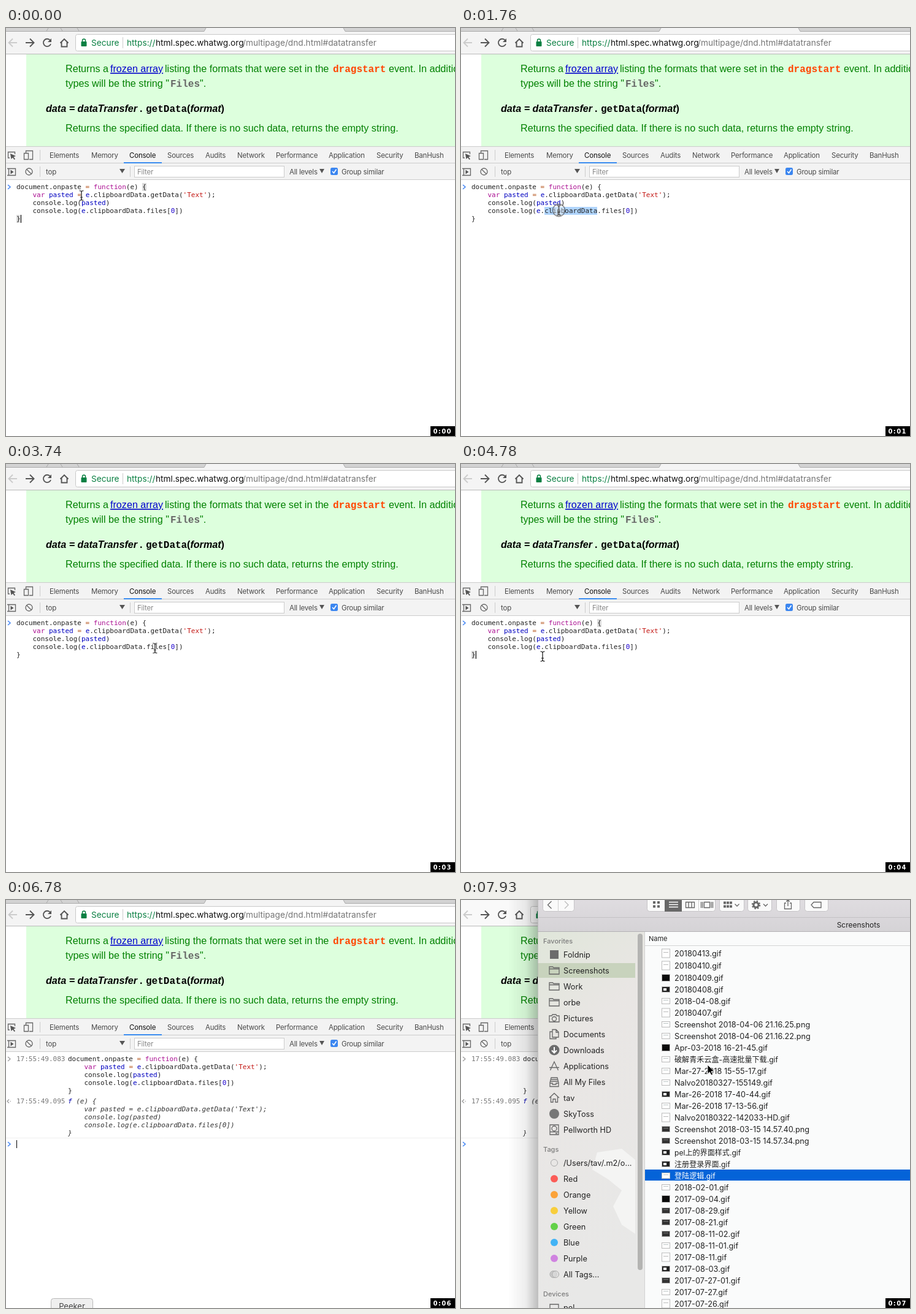
Animation, 732 px wide and 666 px high, one loop 8 s. Source, as an HTML page:

```html
<!DOCTYPE html>
<html lang="en">
<head>
<meta charset="utf-8">
<title>Paste handler in the console</title>
<style>
html, body { margin: 0; width: 100%; height: 100%; overflow: hidden; background: #fff; }
svg { display: block; }
text { white-space: pre; }
.ui { font: 11.5px Inter, Roboto, sans-serif; letter-spacing: -.2px; fill: #4a4a4a; }
.url { font: 13.7px Inter, Roboto, sans-serif; }
.page { font: 16.15px "Liberation Sans", Arial, sans-serif; fill: #008000; }
.page .m { font: bold 16px "Liberation Mono", monospace; }
.page .b { font-weight: bold; fill: #000; }
.page .i { font-style: italic; }
.code { font: 11px "DejaVu Sans Mono", monospace; fill: #222; }
.k { fill: #aa0d91; } .v { fill: #0000c0; } .o { fill: #b5541c; } .s { fill: #c41a16; } .n { fill: #1c00cf; }
.plain { font-style: italic; fill: #333; }
.plain tspan { fill: inherit; }
.files { font: 12.7px Inter, "Noto Sans CJK SC", "Noto Sans CJK", sans-serif; fill: #222; }
.files .cjk { font-size: 12.1px; }
.files .head { font-size: 11px; font-weight: 500; fill: #7c7c7c; }
.line { fill: none; stroke: #666; stroke-width: 1.3; }
.clock { font: bold 10px "DejaVu Sans", sans-serif; letter-spacing: 1.4px; fill: #fff; }

.anim, .path { animation: 8s step-end infinite; }
.path { animation-name: path; animation-timing-function: linear; }
.before { animation-name: before; } .after { animation-name: after; }
.caret { animation-name: caret; } .brace { animation-name: brace; }
.select { animation-name: select; } .ring { animation-name: ring; }
.prompt { animation-name: prompt; } .tip { animation-name: tip; }
.window { animation-name: window; } .inactive { animation-name: inactive; }
.ticks { animation-name: ticks; }

@keyframes before { 0% { opacity: 1 } 68.625% { opacity: 0 } }
@keyframes after { 0% { opacity: 0 } 68.625% { opacity: 1 } }
@keyframes caret {
  0%, 11.875%, 55.375%, 65.75% { opacity: 1 }
  5.9%, 20.5%, 64.25% { opacity: 0 }
}
@keyframes brace { 0%, 55.375% { opacity: 1 } 20.5% { opacity: 0 } }
@keyframes select { 0%, 36.625% { opacity: 0 } 22% { opacity: 1 } }
@keyframes ring {
  0%, 24.875%, 40.875%, 59.75% { opacity: 0 }
  20.5%, 36.625%, 55.375% { opacity: 1 }
}
@keyframes prompt { 0%, 81.875% { opacity: 1 } 76.125%, 93% { opacity: 0 } }
@keyframes tip { 0%, 96.125% { opacity: 0 } 83.25% { opacity: 1 } }
@keyframes window { 0% { opacity: 0 } 90.75% { opacity: 1 } }
@keyframes inactive { 0% { opacity: 0 } 93% { opacity: 1 } }
@keyframes ticks {
  0% { transform: translateY(0) }
  16.25% { transform: translateY(-16px) }
  29.25% { transform: translateY(-32px) }
  40.875% { transform: translateY(-48px) }
  54% { transform: translateY(-64px) }
  65.75% { transform: translateY(-80px) }
  79% { transform: translateY(-96px) }
  93% { transform: translateY(-112px) }
}
@keyframes path {
  0%, 1.4% { transform: translate(123px, 273.5px) }
  3.1% { transform: translate(132px, 267px) }
  6% { transform: translate(152px, 270px) }
  8.9% { transform: translate(172px, 288px) }
  10.4% { transform: translate(178px, 295px) }
  14.75% { transform: translate(166px, 297px) }
  17.6%, 24% { transform: translate(159.5px, 297.5px) }
  30.6%, 42.5% { transform: translate(257px, 297px) }
  46.75% { transform: translate(243px, 300.5px) }
  52.75%, 75.9% { transform: translate(133px, 314px) }
  81.8%, 95% { transform: translate(112px, 674px) }
  96.1% { transform: translate(330px, 420px) }
  97.6% { transform: translate(416px, 285px) }
  99.1%, 100% { transform: translate(404px, 267px) }
}
</style>
</head>
<body>
<svg width="732" height="666" viewBox="0 0 732 666">
  <defs>
    <linearGradient id="shade"><stop offset="0" stop-opacity="0"/><stop offset=".6" stop-opacity=".07"/><stop offset="1" stop-opacity=".25"/></linearGradient>
    <linearGradient id="bar" x2="0" y2="1"><stop stop-color="#dfdce0"/><stop offset="1" stop-color="#d5d3d6"/></linearGradient>
    <linearGradient id="side" x2=".25" y2="1"><stop stop-color="#e0e6da"/><stop offset=".35" stop-color="#e9e6e4"/><stop offset="1" stop-color="#e8e8e7"/></linearGradient>
  </defs>

  <!-- browser chrome -->
  <rect width="732" height="42" fill="#f4f4f4"/>
  <path d="M0 0H326L323 5.5H0ZM550 0H732V5.5H553Z" fill="#d3d3d3"/>
  <path d="M0 5.5H323L326 0M550 0L553 5.5H732M66 5L69 0M89 0L92 5M116 0L119 5" fill="none" stroke="#aaa"/>
  <rect class="anim inactive" width="126" height="42" fill="#f9f9f9"/>
  <rect x="113.5" y="10.5" width="640" height="27" rx="3" fill="#fff" stroke="#c9c9c9"/>
  <path d="M0 42.5H732" stroke="#b9b9b9"/>
  <g fill="none" stroke="#555" stroke-width="1.9">
    <path d="M18 24H5M11 17.500L4.500 24L11 30.500" stroke="#ccc"/>
    <path d="M32 24H45M39 17.500L45.500 24L39 30.500"/>
    <path d="M72 20A6.200 6.200 0 1 0 73 26"/>
    <path d="M88.500 24.500L95 18L101.500 24.500M90.500 23V30.500H99.500V23"/>
  </g>
  <path d="M74 17V23H68Z" fill="#555"/>
  <rect x="122.500" y="22" width="9" height="8" rx="1" fill="#0b8043"/>
  <path d="M124.500 22V20.500A2.500 2.500 0 0 1 129.500 20.500V22" fill="none" stroke="#0b8043" stroke-width="1.500"/>
  <path d="M190.500 15V33" stroke="#ccc"/>
  <g class="url">
    <text x="139" y="29" fill="#0b8043">Secure</text>
    <text x="197" y="29" fill="#0b8043">https://</text>
    <text x="244" y="29" fill="#111">html.spec.whatwg.org</text>
    <text x="386" y="29" fill="#757575">/multipage/dnd.html#datatransfer</text>
  </g>

  <!-- page -->
  <rect x="33" y="43" width="699" height="150" fill="#dfd"/>
  <g class="page">
    <text x="97" y="72">Returns a</text>
    <text x="170" y="72" fill="#00c" text-decoration="underline">frozen array</text>
    <text x="259" y="72">listing the formats that were set in the</text>
    <text x="533" y="72" class="m" fill="#ff4500">dragstart</text>
    <text x="624" y="72">event. In addition, if any</text>
    <text x="97" y="96">types will be the string "</text>
    <text x="268" y="96" class="m" fill="#666">Files</text>
    <text x="316" y="96">".</text>
    <text x="65" y="137" class="b i">data = dataTransfer</text>
    <text x="218" y="137" class="b">.</text>
    <text x="228" y="137" class="b m">getData</text>
    <text x="295" y="137" class="b">(<tspan class="i">format</tspan>)</text>
    <text x="97" y="169">Returns the specified data. If there is no such data, returns the empty string.</text>
  </g>

  <!-- developer tools -->
  <rect y="193" width="732" height="473" fill="#fff"/>
  <rect y="193" width="732" height="55" fill="#f3f3f3"/>
  <path d="M0 193.500H732M0 220.500H732M0 247.500H732M55.500 199V216M55.500 226V243M202.500 226V243" stroke="#ccc"/>
  <rect x="192" y="219" width="62" height="2" fill="#3b8df0"/>
  <g class="line">
    <path d="M6 212H3.500V202.500H14.500V206M32.500 204V200.500H43.500V214.500H38M29.500 204.500H36.500V214.500H29.500Z"/>
    <path d="M2 229.500H15.500V240.500H2M4.500 229.500V240.500"/>
    <circle cx="37.500" cy="234.500" r="5.500"/><path d="M33.500 230.500L41.500 238.500"/>
  </g>
  <path d="M7 205L16 209L12.500 210.500L15 214L13.500 215L11 211.500L8.500 214ZM7.500 231.500L12.500 235L7.500 238.500ZM185 230H194L189.500 237ZM511 230H519L515 237Z" fill="#555"/>
  <rect x="209.500" y="225.500" width="244" height="18" fill="#fff" stroke="#ccc"/>
  <rect x="529" y="228" width="12" height="12" rx="2.500" fill="#3b86f0"/>
  <path d="M532 234L534.500 236.800L538.500 230.800" fill="none" stroke="#fff" stroke-width="1.600"/>
  <g class="ui" id="tools"></g>

  <!-- console -->
  <g class="code">
    <g class="anim before">
      <g class="anim brace" fill="#dcdcdc"><path d="M222 253h7v13h-7zM17 305h7v13h-7z"/></g>
      <rect class="anim select" x="136" y="292" width="86" height="13" fill="#b0d5fd"/>
      <path d="M3 256L7 259.500L3 263" fill="none" stroke="#4285f4" stroke-width="1.500"/>
      <g id="typed"></g>
      <rect class="anim caret" x="24" y="305" width="1" height="13" fill="#000"/>
    </g>
    <g class="anim after">
      <path d="M3 256L7 259.500L3 263M5 325.500L2 328.500L5 331.500M6.500 328.500H8" fill="none" stroke="#999" stroke-width="1.200"/>
      <path d="M3 395L7 398.500L3 402" fill="none" stroke="#4285f4" stroke-width="1.500"/>
      <path d="M0 388.500H732" stroke="#eee"/>
      <text x="17" y="263" fill="#777">17:55:49.083</text>
      <text x="17" y="332" fill="#777">17:55:49.095</text>
      <g id="entered"></g>
      <g id="result" class="plain"></g>
      <rect class="anim prompt" x="17" y="392" width="1" height="13" fill="#000"/>
    </g>
  </g>

  <!-- file window -->
  <g class="anim window files">
    <rect x="77" width="48" height="666" fill="url(#shade)"/>
    <rect x="125" width="607" height="666" fill="#fafbfb"/>
    <rect x="125" y="52" width="175" height="614" fill="url(#side)"/>
    <path d="M222 412L262 406L284 424V545L262 530L248 500L262 474L240 456L214 440Z" fill="#f4f4f3"/>
    <rect x="125" y="103" width="159" height="24" fill="#c8d3bd"/>
    <rect x="288" y="55" width="8" height="549" rx="4" fill="#b4b4b2"/>
    <path d="M299.500 52V666" stroke="#d2d2d2"/>
    <rect x="125" width="607" height="52" fill="url(#bar)"/>
    <path d="M125 28.500H732" stroke="#c4c2c5"/><path d="M125 51.500H732" stroke="#b3b1b4"/>
    <path d="M125.500 0V666" stroke="#aaa" stroke-opacity=".6"/>
    <g id="buttons" fill="#fafafa" stroke="#c6c4c7"></g>
    <rect x="332" width="28" height="19" fill="#686868"/>
    <path d="M158.500 0V19M387.500 0V19" stroke="#d0d0d0"/>
    <g class="line">
      <path d="M147.500 2L141.500 8L147.500 14M446.500 6.500L450 10L453.500 6.500M493 6.500L496.500 10L500 6.500"/>
      <path d="M169 2L175 8L169 14" stroke="#bbb"/>
      <path d="M339 3.500H354M339 7.500H354M339 11.500H354" stroke="#fff"/>
      <path d="M366.500 3.500H380.500V12.500H366.500ZM371 3V13M376 3V13M396.500 3.500H405.500V12.500H396.500ZM394 3V13M391.500 3V13M408 3V13M410.500 3V13"/>
      <path d="M530 5H527.500V14.500H538.500V5H536M533 10V0M530 2.500L533 0L536 2.500M571 8L575 3.500H587V12.500H575Z"/>
      <circle cx="481" cy="8" r="4" stroke-width="3"/><circle cx="481" cy="8" r="6.200" stroke-dasharray="2.400 2.470" stroke-width="2"/>
      <path d="M313 4H325M313 10.500H325" stroke-width="4" stroke-dasharray="4 3"/>
      <path d="M428 4.500H442M428 10.500H442" stroke-width="4" stroke-dasharray="4 1"/>
    </g>
    <text x="648" y="44.500" text-anchor="middle" font-size="12">Screenshots</text>
    <text x="306" y="67" font-size="11">Name</text>
    <path d="M300 74.500H732" stroke="#d4d4d4"/>
    <rect x="300" y="440" width="432" height="18" fill="#0463d8"/>
    <g id="sidebar"></g>
    <g id="list"></g>
  </g>

  <g class="anim tip">
    <rect x="73.500" y="650.500" width="68" height="24" rx="4" fill="#efefef" stroke="#b8b8b8"/>
    <text x="107.500" y="668" text-anchor="middle" font-family="Inter, sans-serif" font-size="13" fill="#444">Peeker</text>
  </g>

  <!-- pointer -->
  <g class="path">
    <circle class="anim ring" r="10" fill="#fff" fill-opacity=".35" stroke="#222"/>
    <g class="anim before" fill="none">
      <path d="M-3.500 -8Q0 -8 0 -5.500Q0 -8 3.500 -8M0 -6V6M-3.500 8Q0 8 0 5.500Q0 8 3.500 8M-2 3H2" stroke="#fff" stroke-width="2.400" stroke-opacity=".6"/>
      <path d="M-3.500 -8Q0 -8 0 -5.500Q0 -8 3.500 -8M0 -6V6M-3.500 8Q0 8 0 5.500Q0 8 3.500 8M-2 3H2" stroke="#111" stroke-width="1.200"/>
    </g>
    <path class="anim after" d="M-2 2V17L1.500 13.800L4 19L6.500 18L4.200 12.800H9Z" fill="#000" stroke="#fff" stroke-width=".9"/>
  </g>

  <svg x="692" y="650" width="40" height="16" overflow="hidden">
    <rect width="40" height="16" fill="#000"/>
    <g class="anim ticks clock" id="clock"></g>
  </svg>
</svg>

<script>
const fill = (id, html) => { document.getElementById(id).innerHTML = html; };
const text = (x, y, s, attrs = '') => `<text x="${x}" y="${y}" ${attrs}>${s}</text>`;
const span = (cls, s) => `<tspan class="${cls}">${s}</tspan>`;

const tabs = [['Elements', 71], ['Memory', 139], ['Console', 201], ['Sources', 263], ['Audits', 325],
  ['Network', 377], ['Performance', 440], ['Application', 526], ['Security', 604], ['BanHush', 666]];
const controls = [['top', 65], ['Filter', 214], ['All levels', 462], ['Group similar', 547]];
fill('tools',
  tabs.map(([s, x]) => text(x, 212, s, s === 'Console' ? 'fill="#111"' : '')).join('') +
  controls.map(([s, x]) => text(x, 239, s, s === 'Filter' ? 'fill="#888"' : '')).join(''));

const opening = `document.onpaste ${span('o', '=')} ${span('k', 'function')}(e) {`;
const body = [
  `${span('k', 'var')} ${span('v', 'pasted')} ${span('o', '=')} ${span('v', 'e')}.clipboardData.getData(${span('s', "'Text'")});`,
  `console.log(${span('v', 'pasted')})`,
  `console.log(${span('v', 'e')}.clipboardData.files[${span('n', '0')}])`,
];
const codeBlock = (x, y, first) => text(x, y, first) +
  body.map((s, i) => text(x + 26.5, y + 13 * (i + 1), s)).join('') + text(x, y + 52, '}');
fill('typed', codeBlock(17, 263, opening));
fill('entered', codeBlock(101, 263, opening));
fill('result', codeBlock(101, 332, '<tspan style="fill:#00a">f</tspan> (e) {'));

fill('buttons', [[133, 51], [303, 111], [421, 40], [467, 39], [514, 38], [560, 38]]
  .map(([x, w]) => `<rect x="${x + .5}" y="-6.5" width="${w}" height="25" rx="4"/>`).join(''));

// Sidebar icons, drawn around their own centre
const stroke = d => `<path class="line" d="${d}"/>`;
const dot = color => `<circle r="6" fill="${color}"/>`;
const icons = {
  square: '<rect x="-7" y="-7" width="14" height="14" fill="#6c6c6c"/>',
  folder: stroke('M-8 6V-6H-2.500L-1 -4.500H8V6ZM-8 -2.500H8'),
  camera: stroke('M-8 6V-4H-4L-3 -6H3L4 -4H8V6ZM3.500 1A3.500 3.500 0 1 1 -3.500 1A3.500 3.500 0 1 1 3.500 1'),
  pages: stroke('M-3 -7.500H3L7 -3.500V5H-3ZM3 -7V-3H7M-3 -4H-7V7.500H3V5'),
  down: dot('#6c6c6c').replace('r="6"', 'r="8.5"') + '<path d="M0 -5V4M-4 0.500L0 4.500L4 0.500" fill="none" stroke="#fff" stroke-width="2"/>',
  apps: stroke('M-6.500 7L0 -7L6.500 7M-8 2.500H8'),
  drawer: stroke('M-7 7.500V1L-5 -7H5L7 1V7.500ZM-7 2H-3V4H3V2H7M-5 -4H5M-6 -1H6'),
  house: stroke('M-8 0L0 -7.500L8 0M-5.500 -1.500V7H-2V2H2V7H5.500V-1.500'),
  circle: '<circle r="8" fill="#777"/>',
  disk: stroke('M-7 -8H7V8H-7ZM-7 3.500H7M2 6H5M4 -2A4 4 0 1 1 -4 -2A4 4 0 1 1 4 -2'),
  ring: '<circle r="5.5" fill="none" stroke="#aaa"/>',
  rings: '<circle cx="-1.5" r="5.5" fill="#ccc" stroke="#aaa"/><circle cx="2" r="5.5" fill="#ddd" fill-opacity=".6" stroke="#aaa"/>',
  laptop: stroke('M-7 -5H7V6H-7Z'),
};
const section = (title, y, items) => text(134, y + 4, title, 'class="head"') +
  items.map(([name, icon], i) => {
    const cy = y + 22 + 26 * i;
    return `<g transform="translate(152 ${cy})">${icons[icon] || dot(icon)}</g>` + text(167, cy + 4.7, name);
  }).join('');
fill('sidebar',
  section('Favorites', 67, [['Foldnip', 'square'], ['Screenshots', 'folder'], ['Work', 'folder'], ['orbe', 'folder'],
    ['Pictures', 'camera'], ['Documents', 'pages'], ['Downloads', 'down'], ['Applications', 'apps'],
    ['All My Files', 'drawer'], ['tav', 'house'], ['SkyToss', 'circle'], ['Pellworth HD', 'disk']]) +
  section('Tags', 407, [['/Users/tav/.m2/o...', 'ring'], ['Red', '#fb5c57'], ['Orange', '#fba239'], ['Yellow', '#f8ce3c'],
    ['Green', '#63d148'], ['Blue', '#42b3f5'], ['Purple', '#d083e0'], ['All Tags...', 'rings']]) +
  section('Devices', 643, [['pel', 'laptop']]));

const files = `20180413.gif|20180410.gif|20180409.gif|20180408.gif|2018-04-08.gif|20180407.gif
Screenshot 2018-04-06 21.16.25.png|Screenshot 2018-04-06 21.16.22.png|Apr-03-2018 16-21-45.gif
破解青禾云盒-高速批量下载.gif|Mar-27-2018 15-55-17.gif|Nalvo20180327-155149.gif
Mar-26-2018 17-40-44.gif|Mar-26-2018 17-13-56.gif|Nalvo20180322-142033-HD.gif
Screenshot 2018-03-15 14.57.40.png|Screenshot 2018-03-15 14.57.34.png|pel上的界面样式.gif
注册登录界面.gif|登陆逻辑.gif|2018-02-01.gif|2017-09-04.gif|2017-08-29.gif|2017-08-21.gif
2017-08-11-02.gif|2017-08-11-01.gif|2017-08-11.gif|2017-08-03.gif|2017-07-27-01.gif
2017-07-27.gif|2017-07-26.gif`.split(/[|\n]/);
// p: page, w: light window, d: black, k: dark with lines, m: dark with a light patch
const kinds = 'ppdmwpwwdwwwmwpkkmmwwdkkkwpmkwp';
const thumb = (kind, y) => {
  const h = kind === 'p' ? 14 : kind === 'd' ? 11 : 9;
  const color = { d: '#0a0a0a', k: '#333', m: '#222' }[kind] || '#fff';
  const mark = { p: '#bbb', w: '#bcc5c5', k: '#777', m: '#fff', d: '#111' }[kind];
  return `<rect x="327.5" y="${y - h / 2}" width="13" height="${h}" fill="${color}" stroke="#bbb"/>` +
    `<rect x="330" y="${y - 2}" width="${kind === 'm' ? 5 : 8}" height="${kind === 'm' ? 4 : 1}" fill="${mark}"/>`;
};
fill('list', files.map((name, i) => {
  const y = i < 2 ? 87 + 20 * i : 127 + 19 * (i - 2);
  const cls = /[^\x00-\x7f]/.test(name) ? 'class="cjk"' : '';
  return thumb(kinds[i], y) + text(348, y + 4.5, name, cls + (i === 19 ? ' fill="#fff"' : ''));
}).join(''));

fill('clock', Array.from({ length: 8 }, (_, i) => text(4.5, 11.5 + 16 * i, `0:0${i}`)).join(''));
</script>
</body>
</html>
```
